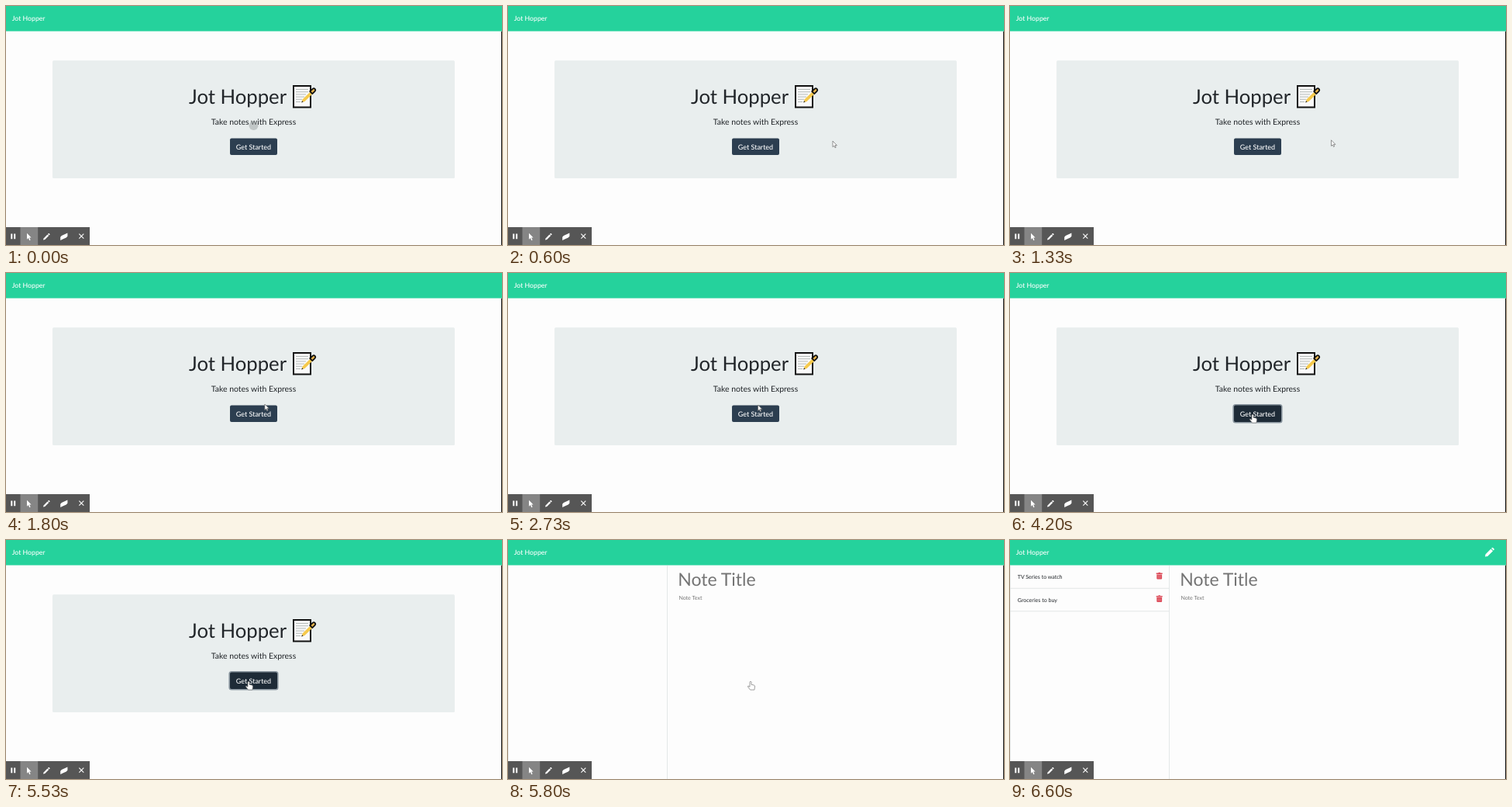
Animation of 640x308 px, one loop 8000 ms. Source, as an HTML page:

```html
<!DOCTYPE html>
<html lang="en">
<head>
<meta charset="utf-8">
<title>Jot Hopper</title>
<style>
  html, body { margin: 0; width: 100%; height: 100%; overflow: hidden; background: #fdfdfd; }
  svg { display: block; width: 100%; height: 100%; font-family: Lato, sans-serif; text-rendering: geometricPrecision; }
  .mid { text-anchor: middle; }
  .bar { fill: #fff; font-weight: 500; }
  .ink { fill: #212529; }
  .hint { fill: #747474; }
  .rule { stroke: #dde1e1; stroke-width: .8; fill: none; }
</style>
</head>
<body>
<svg viewBox="0 0 640 308">
  <defs>
    <g id="bin" fill="#dc4a58">
      <path d="M188.7 42.6h2.5l.6-.9h1.8l.6.9h2.5v1.4h-8z"/>
      <path d="M189.3 44.5h6.8v5q0 1-1 1h-4.8q-1 0-1-1z"/>
      <path d="M191.1 45.6v3.8M192.7 45.6v3.8M194.3 45.6v3.8" stroke="#ee9aa2" stroke-width=".5"/>
    </g>
  </defs>

  <path fill="#111" d="M639 32.5h1V308h-1z"/>
  <path fill="#25d29c" d="M0 0h640v32.5H0z"/>
  <text class="bar" x="7.8" y="19.4" font-size="8.7">Jot Hopper</text>

  <g id="home">
    <rect x="60" y="70.3" width="519" height="151.7" rx="1.5" fill="#e9eeee"/>
    <text class="ink" x="236" y="125.6" font-size="25.7">Jot Hopper</text>
    <g id="memo">
      <path d="M371 103h22v27.5h-22z" fill="#fafafa" stroke="#111" stroke-width="2"/>
      <path d="M374 107.5h16M374 110.7h16M374 113.9h13M374 117.1h11M374 120.3h8M374 123.5h6" stroke="#b4bab8"/>
      <path d="M381.5 124.2l1.2-4 10.5-10.2 2.8 2.8-10.5 10.2z" fill="#f5c94c"/>
      <path d="M392.2 110l3.4-3.2q1.7-1.3 3 0t0 3l-3.3 3.3z" fill="#e9b44c" stroke="#111" stroke-width="1.8" stroke-linejoin="round"/>
      <path d="M381.2 124.5l.8-2.5 1.6 1.7z" fill="#333"/>
    </g>
    <text class="ink mid" x="319.5" y="153" font-size="10.45">Take notes with Express</text>
    <rect id="button" x="289" y="170.5" width="61" height="21.5" rx="2" stroke-width="3.2" paint-order="stroke"/>
    <text class="bar mid" x="319.5" y="184.6" font-size="8.95">Get Started</text>
    <circle id="dot" cx="319.5" cy="154" r="6" fill="#9aa0a0"/>
  </g>

  <g id="notes">
    <path class="rule" d="M.4 33v275M205.5 33v275"/>
    <text class="hint" x="219.2" y="59" font-size="23">Note Title</text>
    <text class="hint" x="220.4" y="77.3" font-size="7.05">Note Text</text>
    <g id="list">
      <path class="rule" d="M0 62.3h205.5M0 91.8h205.5"/>
      <g class="ink" font-size="7.05">
        <text x="9.8" y="50">TV Series to watch</text>
        <text x="9.8" y="79.5">Groceries to buy</text>
      </g>
      <use href="#bin"/>
      <use href="#bin" y="29.5"/>
      <path fill="#fff" d="M613 21.6l.5-3.2 6.9-6.9 2.7 2.7-6.9 6.9zM621.1 10.8l.9-.9q.6-.5 1.2 0l1.5 1.5q.5.6 0 1.2l-.9.9z"/>
    </g>
  </g>

  <g id="cursor" fill="#fff" stroke-linejoin="round" stroke-width=".7">
    <path id="arrow" stroke="#666" d="M0 0V7.6l1.8-1.5 1.2 2.6 1.2-.6L3 5.6h2.4z"/>
    <path id="hand" stroke="#777" d="M-1 1q0-1 1-1t1 1v3l3.2.7q1.5.4 1.3 2l-.6 4.1h-5.4l-3-4q-.2-1.7 1.5-.6l1 .8z"/>
  </g>

  <g id="toolbar">
    <path fill="#565656" d="M0 285h108v23H0z"/>
    <path fill="#858585" d="M18.5 285h22.7v23H18.5z"/>
    <g fill="#fff">
      <path d="M6.3 293.4h2v6.9h-2zM10.2 293.4h2v6.9h-2z"/>
      <path d="M27 292.7v8l1.9-1.6 1.4 3.1 1.3-.6-1.4-3.1 2.4-.1z"/>
      <path d="M48 301.6l.5-2.2 5-5 1.7 1.7-5 5zM54 293.9l.9-.8q.4-.4.8 0l.8.8q.4.4 0 .8l-.8.9z"/>
      <path d="M70.2 302v-4.2l1.6-1.7 7.6-3.6v4.2l-1.7 1.8-5 2.2z"/>
    </g>
    <path d="M94.3 293.7l6 6M100.3 293.7l-6 6" stroke="#fff" stroke-width="1.1"/>
  </g>
</svg>
<script>
  const LOOP = 8000;
  const el = id => document.getElementById(id);
  const show = (id, on) => el(id).setAttribute('visibility', on ? 'inherit' : 'hidden');

  // Pointer tip: time, x, y
  const path = [
    [600, 419, 174], [800, 417, 172], [930, 414.5, 172.8],
    [1330, 414.5, 172.8], [1930, 323, 168.5],
    [2330, 323, 168.5], [2400, 322.5, 170],
    [2930, 322.5, 170], [3130, 319, 179.5],
    [3400, 319, 179.5], [3660, 314, 185.5], [3860, 313, 182.3]
  ];

  function pointer(t) {
    const i = path.findIndex(p => p[0] > t);
    if (i < 0) return path.at(-1).slice(1);
    if (i === 0) return path[0].slice(1);
    const [a, b] = [path[i - 1], path[i]];
    const u = (t - a[0]) / (b[0] - a[0]);
    const k = u * u * (3 - 2 * u);
    return [a[1] + (b[1] - a[1]) * k, a[2] + (b[2] - a[2]) * k];
  }

  function draw(now) {
    const t = now % LOOP;
    const home = t < 5800, hover = t >= 3000, focus = t >= 4200;
    show('home', home);
    show('notes', !home);
    show('list', t >= 6000);
    el('dot').setAttribute('opacity', .5 * Math.max(0, Math.min(1, (200 - t) / 140)));

    const button = el('button');
    button.setAttribute('fill', hover ? '#1e2b37' : '#2c3e50');
    button.setAttribute('stroke', focus ? '#8a969f' : 'none');

    show('cursor', t >= 600 && t < 6260);
    show('arrow', t >= 600 && !hover);
    show('hand', hover && t < 6260);
    el('cursor').setAttribute('transform', `translate(${pointer(t)})`);
  }

  const start = performance.now();
  function tick() {
    draw(performance.now() - start);
    requestAnimationFrame(tick);
  }
  tick();
</script>
</body>
</html>
```
